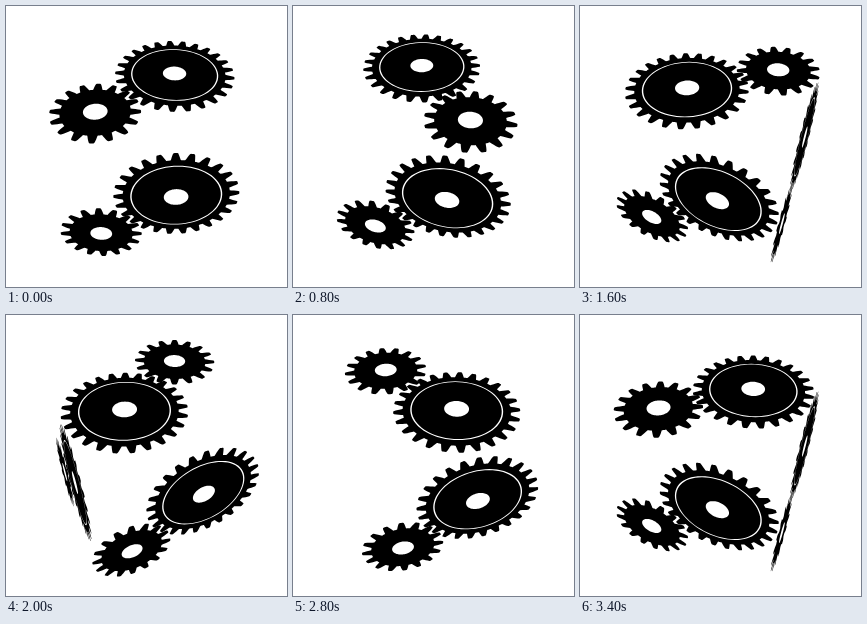
An HTML page with a canvas for the animation above (3600 ms loop, 281 by 281 pixels).

```html
<!DOCTYPE html>
<html lang="en">
<head>
<meta charset="utf-8">
<title>Gear cube</title>
<style>
  html, body { margin: 0; width: 100%; height: 100%; overflow: hidden; background: #fff; }
  canvas { display: block; width: 281px; height: 281px; }
</style>
</head>
<body>
<canvas id="stage" width="281" height="281"></canvas>
<script>
const ctx = document.getElementById('stage').getContext('2d');
const SIZE = 281, LOOP = 3600, STEPS = 18;
const RAD = Math.PI / 180, TAU = Math.PI * 2;
const HALF = 78, DISTANCE = 480, PITCH = 44.5 * RAD;
const SIN = Math.sin(PITCH), COS = Math.cos(PITCH);

// Gears in face coordinates; phase is the direction of one tooth.
const big = { u: 25.5, v: 15.5, tip: 54, root: 46, teeth: 25, hole: 10.6, ring: 38.9, phase: 280 * RAD };
const small = { u: -42.5, v: -38, tip: 38, root: 29.5, teeth: 16, hole: 10.2, phase: 45 * RAD };

function project(x, y, z, angle) {
  const c = Math.cos(angle), s = Math.sin(angle);
  const rx = x * c + z * s, rz = z * c - x * s;
  const scale = DISTANCE / (DISTANCE - y * SIN - rz * COS);
  return [SIZE / 2 + rx * scale, SIZE / 2 - (y * COS - rz * SIN) * scale];
}

const topFace = angle => (u, v) => project(u, HALF, -v, angle);
const sideFace = angle => (u, v) => project(u, v, HALF, angle);

function trace(face, gear, radius, count) {
  for (let i = 0; i < count; i++) {
    const a = i / count * TAU, r = radius(a);
    const point = face(gear.u + r * Math.cos(a), gear.v + r * Math.sin(a));
    if (i) ctx.lineTo(...point);
    else ctx.moveTo(...point);
  }
  ctx.closePath();
}

const circle = (face, gear, r) => trace(face, gear, () => r, 72);

function drawGear(face, gear) {
  const profile = a => {
    const lift = 0.46 + 0.8 * Math.cos(gear.teeth * (a - gear.phase));
    return gear.root + (gear.tip - gear.root) * Math.min(1, Math.max(0, lift));
  };
  ctx.beginPath();
  trace(face, gear, profile, gear.teeth * 20);
  circle(face, gear, gear.hole);
  if (gear.ring) {
    circle(face, gear, gear.ring + 0.6);
    circle(face, gear, gear.ring - 0.6);
  }
  ctx.fill('evenodd');
}

function drawFace(face) {
  drawGear(face, big);
  drawGear(face, small);
}

function draw(time) {
  const angle = Math.floor(time % LOOP / LOOP * STEPS) / STEPS * TAU;
  ctx.fillStyle = '#fff';
  ctx.fillRect(0, 0, SIZE, SIZE);
  ctx.fillStyle = '#000';
  drawFace(topFace(angle));
  for (let side = 0; side < 4; side++) {
    const turn = angle + side * TAU / 4;
    if (DISTANCE * COS * Math.cos(turn) > HALF) drawFace(sideFace(turn));
  }
}

const start = performance.now();
function tick() {
  draw(performance.now() - start);
  requestAnimationFrame(tick);
}
tick();
</script>
</body>
</html>
```
